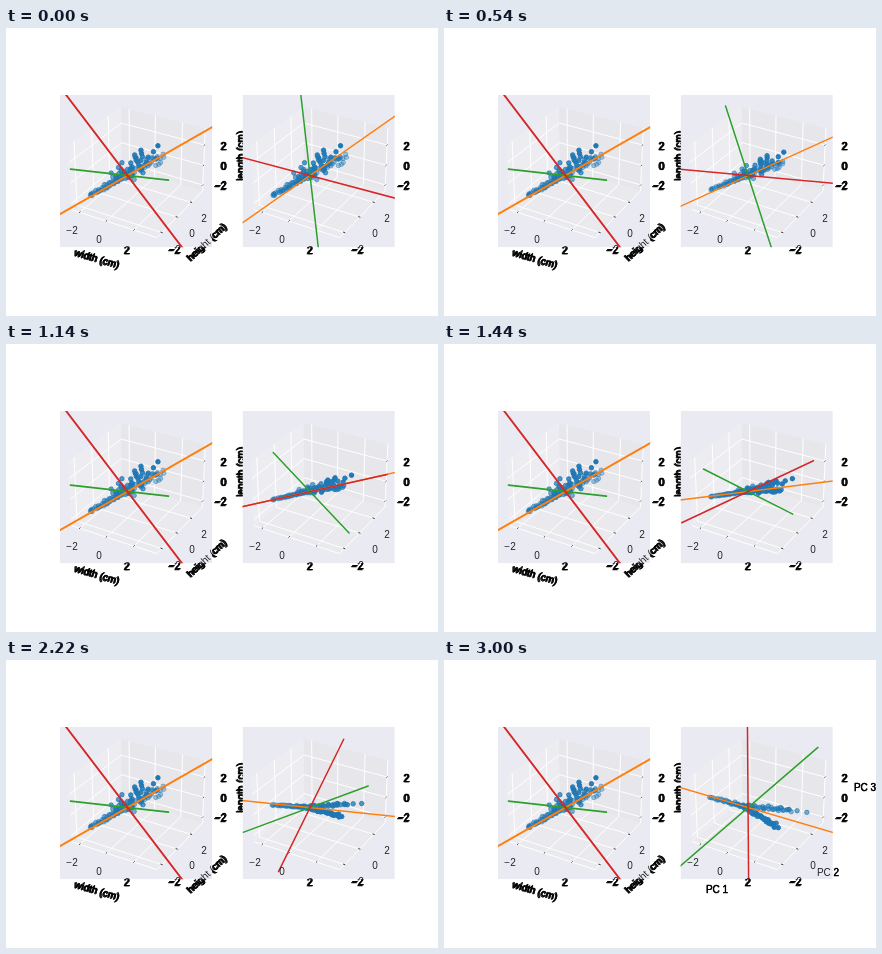
These frames come from a looping animation (432x288 px, 6.03 s). An HTML page:

```html
<!DOCTYPE html>
<html lang="en">
<head>
<meta charset="utf-8">
<title>Principal axes</title>
<style>
  html, body { margin: 0; width: 100%; height: 100%; overflow: hidden; background: #fff; }
  svg { display: block; width: 432px; height: 288px; }
  text { font: 10px "Liberation Sans", Arial, sans-serif; fill: #262626; text-anchor: middle; }
  .heavy text { fill: #000; stroke: #000; stroke-width: .4px; }
  .grid { fill: none; stroke: #fff; stroke-width: 1; }
  .tick { fill: none; stroke: #262626; stroke-width: .9; }
  .axis { fill: none; stroke-linecap: round; }
  circle { fill: #1f77b4; stroke: #1f77b4; stroke-width: 1; }
</style>
</head>
<body>
<svg id="stage" viewBox="0 0 432 288"></svg>
<script>
const STEP = 30, STEPS = 100, LOOP = 6030;
const SIZE = 152.2, TOP = 67, LEFTS = [54, 236.6];
const MIN = -2.625, MAX = 3.625, TICKS = [-2, 0, 2], REACH = 10;
const COLORS = ["#ff7f0e", "#2ca02c", "#d62728"];
// Rows are the principal directions.
const V = [[.608, .548, .574], [.11, -.775, .622], [.786, -.315, -.5315]];
const EYE_C = Math.cos(Math.PI / 6), EYE_S = .5;

const stage = document.getElementById("stage");

function add(parent, tag, attrs, text) {
  const el = document.createElementNS("http://www.w3.org/2000/svg", tag);
  for (const key in attrs) el.setAttribute(key, attrs[key]);
  if (text) el.textContent = text;
  parent.appendChild(el);
  return el;
}

// Perspective view from azimuth -60 and elevation 30 degrees.
function project([x, y, z], left) {
  const a = (x - .5) * .1905, b = (y - .5) * .1905, c = (z - .5) * .1429;
  const right = EYE_C * a + EYE_S * b;
  const up = -.25 * a + .433 * b + EYE_C * c;
  const depth = .433 * a - .75 * b + .5 * c;
  const k = SIZE / .185 / (10 - depth);
  return { x: left + .5135 * SIZE + k * right, y: TOP + .4865 * SIZE - k * up, depth };
}

function path(points, left) {
  return "M" + points.map(p => {
    const q = project(p, left);
    return q.x.toFixed(2) + " " + q.y.toFixed(2);
  }).join("L");
}

function seeded(seed) {
  return () => (seed = (seed * 16807) % 2147483647) / 2147483647;
}

// A stem that forks into two branches, plus a few outliers.
function makeScores() {
  const rnd = seeded(4217);
  const noise = s => (rnd() + rnd() + rnd() - 1.5) * 2 * s;
  const list = [
    [3.3, 1.8, -.4], [2.2, 1.75, -.75], [2.75, 1.5, -.25], [2.7, -.9, -.25],
    [.5, 1.1, -.8], [-2.9, 0, -.1], [-2.8, .05, -.15], [-2.85, -.08, -.05], [1.5, 1.3, -.6]
  ];
  const branch = (count, from, to, bend, along, at) => {
    for (let i = 0; i < count; i++) {
      const u = from + (to - from) * Math.pow(i / (count - 1), bend);
      const k = along();
      const [b, c] = at(u);
      list.push([u + .433 * k, b - .75 * k, c + .667 * k]);
    }
  };
  branch(40, -2.75, .2, .85, () => noise(.08), u => [.05 + noise(.05), -.1 + noise(.06)]);
  branch(30, -.8, 2.2, 1, () => .12 + noise(.36), u => [.65 + .4 * u + noise(.08), -.38 + noise(.08)]);
  branch(38, -.2, 2.5, 1, () => noise(.3), u => [-.1 - .3 * u + noise(.08), -.02 - .08 * u + noise(.1)]);
  return list;
}

const scores = makeScores();
const raw = scores.map(s => [0, 1, 2].map(j => s[0] * V[0][j] + s[1] * V[1][j] + s[2] * V[2][j]));
const mix = (a, b, t) => a.map((v, i) => v + (b[i] - v) * t);

const defs = add(stage, "defs", {});
const box = left => `M${left} ${TOP}h${SIZE}v${SIZE}h${-SIZE}z`;
add(add(defs, "clipPath", { id: "outside" }), "path", {
  d: "M0 0H432V288H0z" + LEFTS.map(box).join(""), "clip-rule": "evenodd"
});

add(stage, "rect", { width: 432, height: 288, fill: "#fff" });

function drawBox(g, left) {
  const pane = (color, pts) =>
    add(g, "path", { d: path(pts, left) + "z", fill: color, "fill-opacity": .5 });
  pane("#f2f2f2", [[MIN, MIN, MIN], [MIN, MAX, MIN], [MIN, MAX, MAX], [MIN, MIN, MAX]]);
  pane("#e6e6e6", [[MIN, MAX, MIN], [MAX, MAX, MIN], [MAX, MAX, MAX], [MIN, MAX, MAX]]);
  pane("#ececec", [[MIN, MIN, MIN], [MAX, MIN, MIN], [MAX, MAX, MIN], [MIN, MAX, MIN]]);
  const line = (cls, pts) => add(g, "path", { class: cls, d: path(pts, left) });
  for (const v of TICKS) {
    line("grid", [[v, MIN, MIN], [v, MAX, MIN], [v, MAX, MAX]]);
    line("grid", [[MAX, v, MIN], [MIN, v, MIN], [MIN, v, MAX]]);
    line("grid", [[MIN, MIN, v], [MIN, MAX, v], [MAX, MAX, v]]);
  }
  line("grid", [[MIN, MIN, MIN], [MAX, MIN, MIN], [MAX, MAX, MIN], [MAX, MAX, MAX]]);
  for (const v of TICKS) {
    line("tick", [[v, MIN + .1, MIN], [v, MIN - .05, MIN]]);
    line("tick", [[MAX - .1, v, MIN], [MAX + .05, v, MIN]]);
    line("tick", [[MAX, MAX - .1, v], [MAX, MAX + .05, v]]);
  }
}

function makePanel(left, i) {
  add(add(defs, "clipPath", { id: "panel" + i }), "path", { d: box(left) });
  const g = add(stage, "g", { "clip-path": `url(#panel${i})` });
  add(g, "path", { d: box(left), fill: "#eaeaf2" });
  drawBox(g, left);
  const dots = scores.map(() => add(g, "circle", { r: 2.24 }));
  const width = i ? 1.5 : 1.9;
  const lines = COLORS.map(color =>
    add(g, "path", { class: "axis", stroke: color, "stroke-width": width }));
  return { left, dots, lines };
}

function drawPanel(panel, points, dirs) {
  const placed = points.map(p => project(p, panel.left)).sort((a, b) => a.depth - b.depth);
  const far = placed[0].depth, span = placed[placed.length - 1].depth - far;
  placed.forEach((p, i) => {
    const dot = panel.dots[i];
    const alpha = (.35 + .65 * (p.depth - far) / span).toFixed(3);
    dot.setAttribute("cx", p.x.toFixed(2));
    dot.setAttribute("cy", p.y.toFixed(2));
    dot.setAttribute("fill-opacity", alpha);
    dot.setAttribute("stroke-opacity", alpha);
  });
  dirs.forEach((d, i) => {
    const ends = [-REACH, REACH].map(k => d.map(v => v * k));
    panel.lines[i].setAttribute("d", path(ends, panel.left));
  });
}

const panels = LEFTS.map(makePanel);

// Outside the panels text is heavier and has a slightly shifted double.
const plain = add(stage, "g", {});
const outer = add(stage, "g", { class: "heavy", "clip-path": "url(#outside)" });
const ghost = add(outer, "g", { transform: "translate(-1 .6)" });

function label(text, x, y, angle = 0, layers = [plain, outer, ghost]) {
  return layers.map(layer => add(layer, "text", {
    x: 0, y: 3.6, transform: `translate(${x} ${y}) rotate(${angle})`
  }, text));
}

for (const dx of [0, 183]) {
  const spots = [
    [66, 202.5], [93, 211.5], [121.3, 222],
    [169, 221.5], [186, 205], [198, 190],
    [215, 157.5], [218, 138], [218, 118]
  ];
  spots.forEach(([x, y], i) => label(["\u22122", "0", "2"][i % 3], x + dx, y));
}
label("width (cm)", 91.5, 230.3, 16.5);
label("height (cm)", 201, 213.7, -43);
// The right panel covers part of this one.
label("length (cm)", 235.5, 127.5, -90, [outer, ghost]);

const finals = [
  ...label("PC 1", 273, 229.5, 0, [plain, outer]),
  ...label("PC 2", 384, 212.5, 0, [plain, outer]),
  ...label("PC 3", 421, 127, 0, [plain, outer])
];

drawPanel(panels[0], raw, V);

let shown = -1;
function render(ms) {
  const step = Math.min(STEPS, Math.floor((ms % LOOP) / STEP));
  if (step === shown) return;
  shown = step;
  const t = step / STEPS;
  const dirs = [0, 1, 2].map(j =>
    mix(V.map(row => row[j]), [0, 1, 2].map(i => +(i === j)), t));
  drawPanel(panels[1], raw.map((p, i) => mix(p, scores[i], t)), dirs);
  for (const el of finals) el.setAttribute("visibility", step === STEPS ? "visible" : "hidden");
}

const start = performance.now();
function tick() {
  render(performance.now() - start);
  requestAnimationFrame(tick);
}
tick();
</script>
</body>
</html>
```
